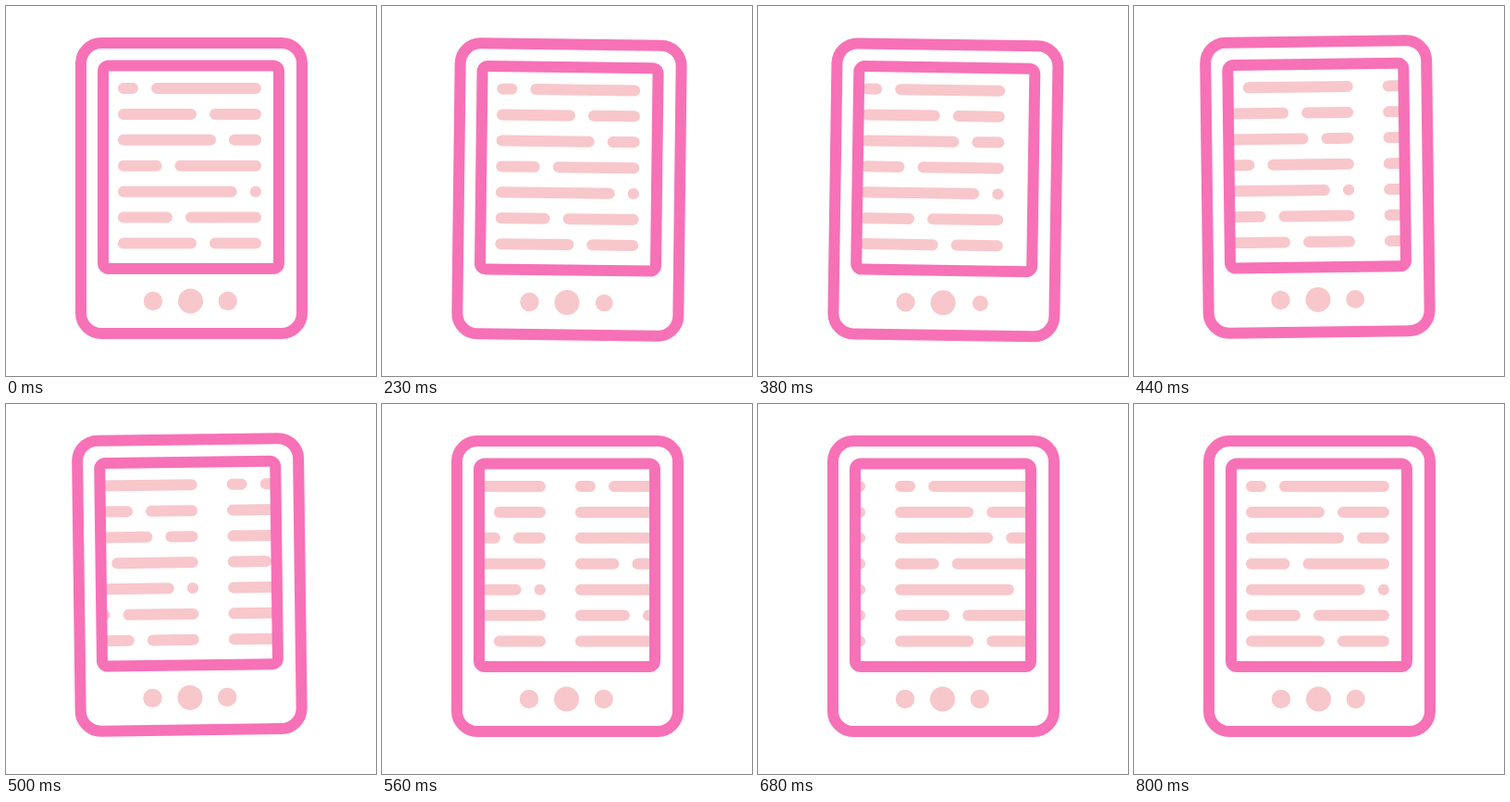
Recreate the animation shown at these times as an HTML page. Size 400 px wide and 400 px high, loop 0.83 s.

```html
<!DOCTYPE html>
<html lang="en">
<head>
<meta charset="utf-8">
<title>E-reader page turn</title>
<style>
  html, body { margin: 0; width: 100%; height: 100%; overflow: hidden; background: #fff; }
  svg { display: block; width: 100%; height: 100%; }
  .case { fill: none; stroke: #f771b7; stroke-width: 12; }
  .soft { fill: #f7c7cb; }
  .lines { fill: none; stroke: #f7c7cb; stroke-width: 12; stroke-linecap: round; }
</style>
</head>
<body>
<svg viewBox="0 0 400 400">
  <defs>
    <clipPath id="screen"><rect x="108" y="68" width="184" height="213"/></clipPath>
    <path id="page" class="lines"/>
  </defs>
  <g id="reader">
    <g clip-path="url(#screen)">
      <g id="pages">
        <use href="#page"/>
        <use href="#page" x="187"/>
      </g>
    </g>
    <rect class="case" x="81" y="40" width="239" height="314" rx="22"/>
    <rect class="case" x="105" y="64.5" width="190" height="219.5" rx="6"/>
    <circle class="soft" cx="159" cy="319" r="10.2"/>
    <circle class="soft" cx="199.5" cy="319" r="13.5"/>
    <circle id="button" class="soft" cx="239.7" cy="319" r="10.2"/>
    <circle id="gap" cx="239.7" cy="319" r="3.2" fill="none" stroke="#fff"/>
  </g>
</svg>
<script>
  const LOOP = 830, STEP = 30, HOLD = 200, PAGE = 187;
  const $ = id => document.getElementById(id);

  // Each row is two bars; the list holds where the first one ends.
  const splits = [143, 206, 227, 168.5, 249.7, 180, 206];
  $('page').setAttribute('d', splits.map((end, i) => {
    const y = 89 + i * 27.92;
    return `M127 ${y}H${end - 6}M${end + 20} ${y}H270.01`;
  }).join(''));

  const ease = (t, from, to) => {
    const u = Math.min(1, Math.max(0, (t - from) / (to - from)));
    return u * u * (3 - 2 * u);
  };

  function draw(now) {
    const ms = now % LOOP;
    const t = Math.max(HOLD, HOLD + Math.floor((ms - HOLD) / STEP) * STEP);

    const tilt = 2.7 * ease(t, 200, 290) - 3.7 * ease(t, 290, 470) + ease(t, 470, 560);
    const press = ease(t, 200, 290) - ease(t, 290, 470);
    const slide = PAGE * ease(t, 300, 800);

    $('reader').setAttribute('transform', `rotate(${tilt} 75 360)`);
    $('pages').setAttribute('transform', `translate(${-slide})`);
    $('button').setAttribute('r', 10.2 - 3.4 * press);
    $('gap').setAttribute('stroke-width', Math.max(0, press - 0.5) * 6.2);
  }

  const start = performance.now();
  function tick() {
    draw(performance.now() - start);
    requestAnimationFrame(tick);
  }
  tick();
</script>
</body>
</html>
```
